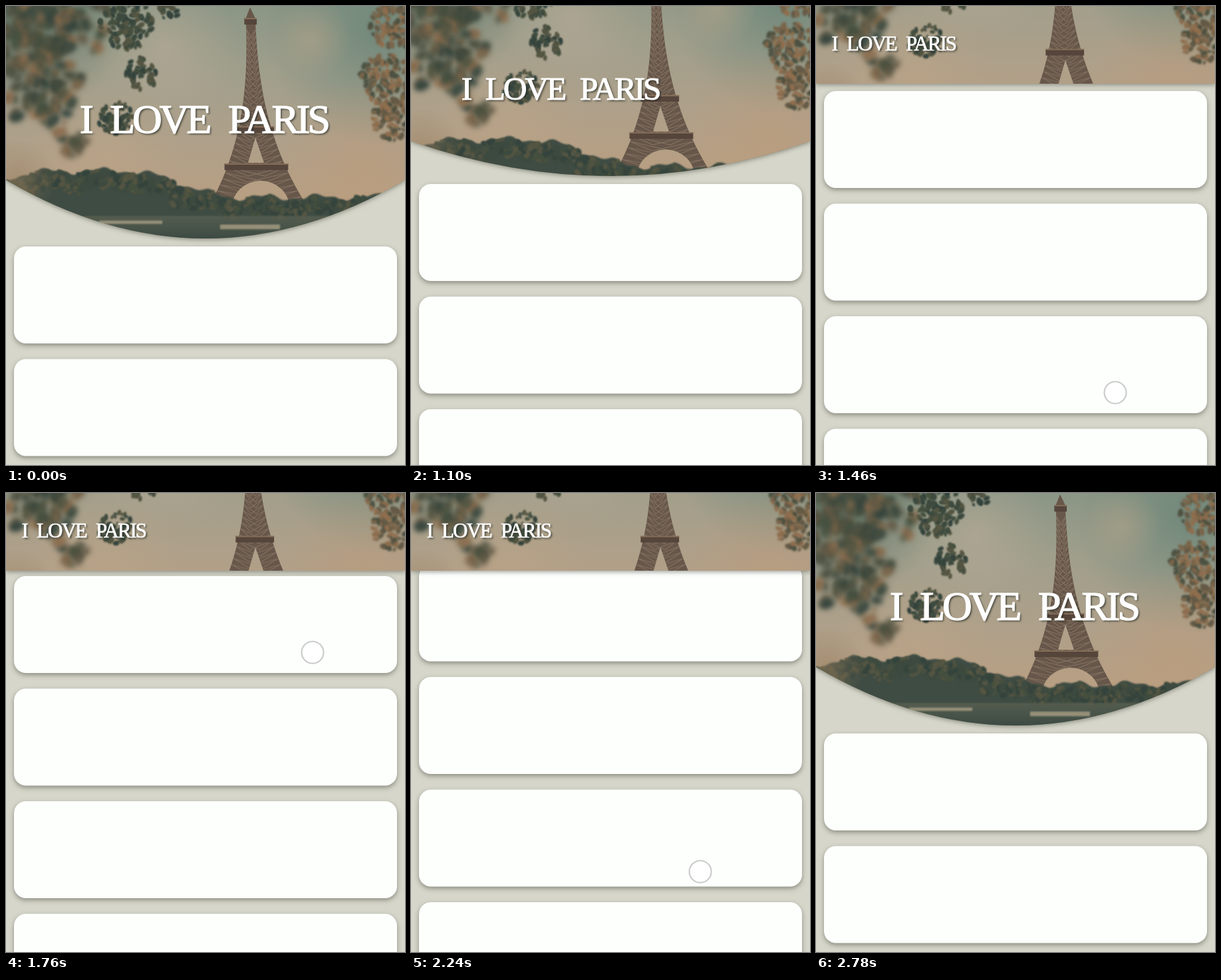
These frames come from a looping animation (600x691 px, 2840 ms). An HTML page with a canvas:

```html
<!DOCTYPE html>
<html lang="en">
<head>
<meta charset="utf-8">
<title>Collapsing header</title>
<style>
  html, body { margin: 0; width: 100%; height: 100%; overflow: hidden; background: #d6d7ca; }
  canvas { display: block; }
</style>
</head>
<body>
<canvas id="stage" width="600" height="691"></canvas>
<script>
const LOOP = 2840, STEP = 60, COLLAPSE = 233;
const ctx = document.getElementById('stage').getContext('2d');

let seed = 11;
const rand = () => (seed = seed * 16807 % 2147483647) / 2147483647;
const pick = list => list[Math.floor(rand() * list.length)];
const clamp = v => Math.min(1, Math.max(0, v));
const smooth = v => (v = clamp(v)) * v * (3 - 2 * v);

const GREENS = ['#34443d', '#3d4a3f', '#46503f', '#545542'];
const BROWNS = ['#4d5141', '#645a46', '#7a654a', '#8f6e4e'];

function glow(c, x, y, r, rgb, alpha) {
  const g = c.createRadialGradient(x, y, 0, x, y, r);
  g.addColorStop(0, `rgba(${rgb},${alpha})`);
  g.addColorStop(1, `rgba(${rgb},0)`);
  c.fillStyle = g;
  c.fillRect(0, 0, 600, 352);
}

// Scatter leaves in a disc, denser near its centre.
function foliage(c, x, y, radius, size, colors) {
  for (let i = 1.6 * (radius / size) ** 2; i > 0; i--) {
    const a = rand() * 2 * Math.PI, d = radius * rand() ** 0.6, r = size * (0.5 + rand());
    c.fillStyle = pick(colors);
    c.beginPath();
    c.ellipse(x + d * Math.cos(a), y + d * Math.sin(a), r, r * 0.65, rand() * 3, 0, 7);
    c.fill();
  }
}

function drawSky(c) {
  const sky = c.createLinearGradient(0, 0, 0, 300);
  ['#8b9685', '#a09f8c', '#aea08a', '#b99f82'].forEach((color, i) => sky.addColorStop(i / 3, color));
  c.fillStyle = sky;
  c.fillRect(0, 0, 600, 352);
  glow(c, 560, 40, 170, '100,130,118', .7);
  glow(c, 20, 0, 170, '78,102,90', .7);
  glow(c, 240, 60, 110, '190,174,154', .5);
  glow(c, 150, 230, 120, '194,166,134', .4);
  glow(c, 540, 240, 130, '190,154,120', .45);
  glow(c, 460, 50, 60, '186,166,138', .5);
}

const towerX = y => 367 + y * .04;
const towerHalf = y => 7 + 66 * (y / 300) ** 2.7;

function drawTower(c) {
  c.save();
  c.beginPath();
  c.moveTo(367, 2);
  for (let y = 18; y <= 305; y += 7) c.lineTo(towerX(y) + towerHalf(y), y);
  for (let y = 305; y >= 18; y -= 7) c.lineTo(towerX(y) - towerHalf(y), y);
  c.closePath();
  c.moveTo(375, 198);
  c.lineTo(364, 236);
  c.lineTo(388, 236);
  c.closePath();
  c.moveTo(427, 306);
  c.ellipse(383, 306, 44, 43, 0, 0, 7);
  c.fillStyle = '#67574a';
  c.fill('evenodd');
  c.clip('evenodd');
  c.strokeStyle = 'rgba(172,154,130,.4)';
  c.lineWidth = 1.2;
  c.beginPath();
  for (let y = 35; y < 310; y += 9) {
    const x = towerX(y), w = towerHalf(y);
    for (const side of [-1, 1]) {
      c.moveTo(x - side * w, y);
      c.lineTo(x + side * w * .3, y + 14);
      c.lineTo(x + side * w, y);
    }
  }
  c.stroke();
  c.restore();
  for (const y of [18, 181, 237]) {
    const w = towerHalf(y) + y / 60 + 2;
    c.fillStyle = '#55453b';
    c.fillRect(towerX(y) - w, y, 2 * w, 10);
    c.fillStyle = '#846c57';
    c.fillRect(towerX(y) - w, y, 2 * w, 2);
  }
}

function drawShore(c) {
  const top = x => 248 + 40 * smooth((x - 180) / 170) + 14 * Math.exp(-x / 25)
    + 4 * Math.sin(x / 13) + 2 * Math.sin(x / 5);
  c.beginPath();
  c.moveTo(0, 352);
  for (let x = 0; x <= 600; x += 4) c.lineTo(x, top(x));
  c.lineTo(600, 352);
  c.fillStyle = '#3f4c43';
  c.fill();
  for (let x = 5; x < 600; x += 15) foliage(c, x, top(x) + 16, 14, 5, GREENS);
  glow(c, 15, 262, 60, '150,126,96', .5);
  const water = c.createLinearGradient(0, 312, 0, 352);
  water.addColorStop(0, 'rgba(92,98,82,.8)');
  water.addColorStop(1, '#3a4943');
  c.fillStyle = water;
  c.fillRect(0, 316, 600, 36);
  c.fillStyle = '#969079';
  c.fillRect(140, 323, 95, 5);
  c.fillRect(322, 329, 90, 7);
}

function makePhoto() {
  const photo = document.createElement('canvas');
  photo.width = 600;
  photo.height = 352;
  const c = photo.getContext('2d');
  drawSky(c);
  c.filter = 'blur(.6px)';
  drawTower(c);
  c.filter = 'blur(1.2px)';
  drawShore(c);

  c.filter = 'blur(4px)';
  for (const [x, y, r] of [[30, 40, 68], [95, 25, 58], [55, 125, 60], [95, 205, 26]])
    foliage(c, x, y, r, 8, GREENS.concat(BROWNS));
  c.filter = 'blur(.8px)';
  for (const [x, y, r] of [[180, 25, 40], [203, 100, 26], [165, 170, 26], [245, 6, 15]])
    foliage(c, x, y, r, 4.5, GREENS);
  c.filter = 'blur(1.8px)';
  for (const [x, y, r] of [[584, 30, 36], [572, 112, 40], [582, 170, 32]])
    foliage(c, x, y, r, 4.5, BROWNS);
  return photo;
}

const photo = makePhoto();

// Scroll gestures as [time, offset]: collapse, flick up, flick back to the top.
const path = [[0, 0], [915, 0], [1100, 94], [1340, 234], [1460, 234], [1760, 576],
  [1990, 780], [2240, 424], [2680, 0], [LOOP, 0]];
const slope = i => (path[i + 1][1] - path[i][1]) / (path[i + 1][0] - path[i][0]);

// Speed at a point: harmonic mean of both sides, so the curve never overshoots.
function speed(i) {
  if (i === 0 || i === path.length - 1) return 0;
  const a = slope(i - 1), b = slope(i);
  return a * b > 0 ? 2 * a * b / (a + b) : 0;
}

function scrollAt(t) {
  const i = path.findIndex(point => point[0] > t) - 1;
  const [t0, a] = path[i], [t1, b] = path[i + 1];
  const span = t1 - t0, u = (t - t0) / span;
  return a + (b - a) * smooth(u)
    + span * u * (1 - u) * (speed(i) * (1 - u) - speed(i + 1) * u);
}

function setShadow(color, blur, x, y) {
  ctx.shadowColor = color;
  ctx.shadowBlur = blur;
  ctx.shadowOffsetX = x;
  ctx.shadowOffsetY = y;
}

function drawCards(scroll) {
  ctx.save();
  setShadow('rgba(70,70,60,.5)', 7, 0, 3);
  ctx.fillStyle = '#fdfffd';
  for (let i = 0; i < 10; i++) {
    ctx.beginPath();
    ctx.roundRect(12, 362 + 169.5 * i - scroll, 576, 146, 18);
    ctx.fill();
  }
  ctx.restore();
}

function drawHeader(p) {
  const bottom = 350 - COLLAPSE * p, bulge = 88 * (1 - p);
  ctx.save();
  ctx.beginPath();
  ctx.moveTo(0, 0);
  ctx.lineTo(0, bottom - bulge);
  ctx.quadraticCurveTo(300, bottom + bulge, 600, bottom - bulge);
  ctx.lineTo(600, 0);
  ctx.closePath();
  setShadow('rgba(70,70,60,.5)', 6, 0, 2);
  ctx.fillStyle = '#8d8a78';
  ctx.fill();
  setShadow('transparent', 0, 0, 0);
  ctx.clip();
  ctx.drawImage(photo, 0, -COLLAPSE / 2 * p);
  ctx.restore();
}

function drawTitle(p) {
  const size = 1 - p / 2;
  ctx.save();
  ctx.translate(111 - 87.5 * p, 191 - 124 * p);
  ctx.scale(size, size);
  ctx.font = '62px "Liberation Serif", "Times New Roman", serif';
  ctx.letterSpacing = '-4px';
  ctx.wordSpacing = '17px';
  ctx.fillStyle = ctx.strokeStyle = '#fff';
  ctx.lineWidth = 1.4;
  setShadow('rgba(30,35,30,.75)', 3, 2, 2);
  ctx.fillText('I LOVE PARIS', 0, 0);
  setShadow('transparent', 0, 0, 0);
  ctx.strokeText('I LOVE PARIS', 0, 0);
  ctx.restore();
}

// The finger carries the list with it while it is down.
function drawTouch(t, scroll) {
  const up = t > 1440 && t < 1800, down = t > 1990 && t < 2270;
  if (!up && !down) return;
  const y = (up ? 816 : 994) - scroll;
  const x = up ? 450 + (583 - y) / 31 : 447 - (y - 200) / 31;
  ctx.beginPath();
  ctx.arc(x, y, 16.5, 0, 7);
  ctx.fillStyle = 'rgba(255,255,255,.5)';
  ctx.fill();
  ctx.strokeStyle = '#cbcdcd';
  ctx.lineWidth = 2.2;
  ctx.stroke();
}

function render(now) {
  const t = Math.max(0, Math.floor((now % LOOP - 20) / STEP) * STEP + 20);
  const scroll = scrollAt(t), p = clamp(scroll / COLLAPSE);
  ctx.fillStyle = '#d6d7ca';
  ctx.fillRect(0, 0, 600, 691);
  drawCards(scroll);
  drawHeader(p);
  drawTitle(p);
  drawTouch(t, scroll);
}

const start = performance.now();
(function frame() {
  render(performance.now() - start);
  requestAnimationFrame(frame);
})();
</script>
</body>
</html>
```
